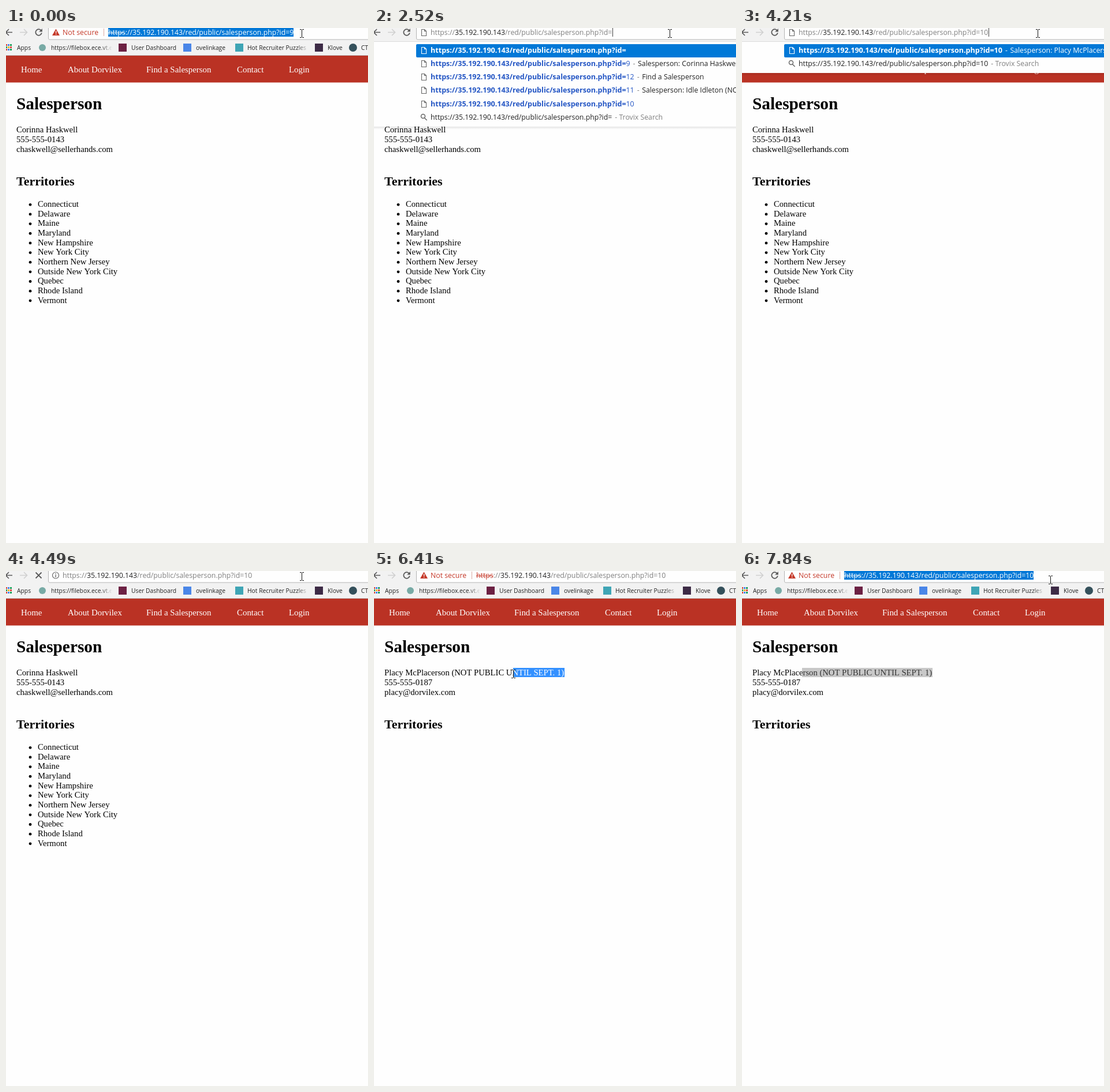
An HTML page with a canvas that plays this animation: 627 px wide and 893 px high, repeating every 8000 ms.

```html
<!DOCTYPE html>
<html lang="en">
<head>
<meta charset="utf-8">
<title>Salesperson lookup</title>
<style>
  html, body { margin: 0; width: 100%; height: 100%; overflow: hidden; background: #fefefe; }
  canvas { display: block; }
</style>
</head>
<body>
<canvas id="stage" width="627" height="893"></canvas>
<script>
const ctx = document.getElementById('stage').getContext('2d');
const LOOP = 8000;
const UI = '12.3px "Open Sans", sans-serif';
const UI_BOLD = 'bold 12.55px "Open Sans", sans-serif';
const SMALL = '10.3px "Open Sans", sans-serif';
const serif = (size, weight = '') => `${weight} ${size}px "Liberation Serif", serif`;
const BODY = serif(14.667);
const BAR = '#f2f2f2', RED = '#c53929', GRAY = '#808080', DARK = '#222', LINK = '#2456c4', BLUE = '#0078d7';
const HOST = '35.192.190.143', PATH = '/red/public/salesperson.php?id=';
const FULL = 'https://' + HOST + PATH;

const TERRITORIES = ['Connecticut', 'Delaware', 'Maine', 'Maryland', 'New Hampshire', 'New York City',
  'Northern New Jersey', 'Outside New York City', 'Quebec', 'Rhode Island', 'Vermont'];
const OLD_PERSON = ['Corinna Haskwell', '555-555-0143', 'chaskwell@sellerhands.com'];
const NEW_PERSON = ['Placy McPlacerson (NOT PUBLIC UNTIL SEPT. 1)', '555-555-0187', 'placy@dorvilex.com'];

// Suggestions: bold ending, plain ending, title
const FIND = 'Find a Salesperson', WHO = 'Salesperson: ';
const IDLE = WHO + 'Idle Idleton (NOT PUBLIC)', PLACY = WHO + NEW_PERSON[0];
const SUGGESTIONS = {
  '': [['', '', ''], ['', '9', WHO + OLD_PERSON[0]], ['', '12', FIND], ['', '11', IDLE], ['', '10', '']],
  '1': [['1', '', WHO + 'Milon Farke'], ['1', '2', FIND], ['1', '1', IDLE], ['1', '0', PLACY]],
  '10': [['10', '', PLACY]]
};

// Step tracks: [start, values...]
const TYPED = [[0, '9'], [1550, ''], [3690, '1'], [4060, '10']];
const CARET = [[0, 0], [410, 1], [1000, 0], [1550, 1], [2110, 0], [2520, 1], [3080, 0], [3690, 1], [4490, 0]];
const PANEL = [[0, 0], [1550, 171], [3690, 165], [3820, 152], [3930, 148], [4060, 91], [4210, 78], [4490, 0]];
const CURSOR = [[0, 'beam', 512, 9], [5590, 'arrow', 466, 39], [5710, 'arrow', 399, 94], [5860, 'arrow', 360, 130],
  [5990, 'beam', 327, 169], [6140, 'arrow', 335, 174], [6260, 'arrow', 337, 175], [6410, 'beam', 241, 178],
  [6560, 'beam', 102, 178], [6690, 'beam', 108, 178], [6840, 'beam', 111, 178], [7000, 'arrow', 410, 188],
  [7150, 'arrow', 481, 68], [7300, 'arrow', 500, 45], [7430, 'arrow', 520, 23], [7570, 'beam', 539, 16],
  [7720, 'beam', 543, 9], [7840, 'beam', 534, 15]];
const MARKED = [[0, 330], [6410, 241], [6560, 98], [6690, 104]];

const at = (track, t) => track.filter(step => step[0] <= t).pop().slice(1);

function rect(x, y, w, h, color) {
  ctx.fillStyle = color;
  ctx.fillRect(x, y, w, h);
}

function dot(x, y, r, color) {
  ctx.fillStyle = color;
  ctx.beginPath();
  ctx.arc(x, y, r, 0, 7);
  ctx.fill();
}

function line(path, color, width = 1.6) {
  ctx.strokeStyle = color;
  ctx.lineWidth = width;
  ctx.stroke(new Path2D(path));
}

// Draws text on a whole-pixel baseline and returns the x where it ends
function text(s, x, y, color, font) {
  ctx.font = font;
  ctx.fillStyle = color;
  ctx.fillText(s, x, Math.round(y));
  return x + ctx.measureText(s).width;
}

function fadeRight(x, y, w, h) {
  const g = ctx.createLinearGradient(x, 0, x + w, 0);
  g.addColorStop(0, BAR + '00');
  g.addColorStop(1, BAR);
  rect(x, y, w, h, g);
}

function clipped(x, y, w, h, draw) {
  ctx.save();
  ctx.beginPath();
  ctx.rect(x, y, w, h);
  ctx.clip();
  draw();
  ctx.restore();
}

function pageIcon(y, color) {
  line(`M82.5 ${y - 5.5}h5l3 3v8h-8zM87.5 ${y - 5.5}v3h3`, color, 1.1);
}

function address(x, id, insecure, selected) {
  ctx.font = UI;
  if (selected) rect(x, 0, Math.round(ctx.measureText(FULL + id).width), 15, BLUE);
  const pick = color => selected ? '#fff' : color;
  const schemeColor = pick(insecure ? RED : GRAY);
  let end = text('https', x, 12, schemeColor, UI);
  if (insecure) rect(x, 8, end - x, 1, schemeColor);
  end = text('://', end, 12, pick(GRAY), UI);
  end = text(HOST, end, 12, pick(DARK), UI);
  return text(PATH + id, end, 12, pick(GRAY), UI);
}

function warning(chipWidth) {
  ctx.fillStyle = RED;
  ctx.fill(new Path2D('M86.5 1.5L93 13H80z'));
  rect(86, 5, 1.3, 4, '#fff');
  rect(86, 10, 1.3, 1.4, '#fff');
  clipped(96, 0, chipWidth - 6, 20, () => text('Not secure', 98, 12, RED, UI));
  rect(96 + chipWidth, 1, 1, 13, '#dba9a2');
}

function toolbar(t, typed, open) {
  rect(0, 0, 627, 47, BAR);
  rect(0, 47, 627, 1, '#bdb6b6');
  rect(73, 0, 554, 20, '#fefefe');
  line('M73.5 0V18q0 2 2 2H627', '#b4b4b4', 1);
  line('M11 7.5H0M5 2L-.5 7.5L5 13', '#5a5a5a');
  line('M24 7.5H36M31 2L36.5 7.5L31 13', '#d0d0d0');
  const loading = t >= 4490 && t < 4910;
  if (loading) line('M51.5 2.5l10 10M61.5 2.5l-10 10', '#5a5a5a', 1.8);
  else {
    line('M61 4.5A5.3 5.3 0 1 0 61.8 8.5', '#5a5a5a', 1.8);
    ctx.fillStyle = '#5a5a5a';
    ctx.fill(new Path2D('M62.8 1v5.6h-5.6z'));
  }

  let end;
  if (open) {
    pageIcon(8, '#666');
    end = address(98, typed, false, false);
  } else if (t >= 4490 && t < 4760) {
    line('M80.5 7.5a5.5 5.5 0 1 0 11 0a5.5 5.5 0 1 0 -11 0', '#666', 1.2);
    rect(85.4, 4, 1.4, 1.5, '#666');
    rect(85.4, 6.6, 1.4, 4.2, '#666');
    end = address(98, typed, false, false);
  } else {
    const sliding = t >= 4760 && t < 4910;
    warning(sliding ? 14 : 73);
    end = address(sliding ? 116 : 177, typed, true, t < 410 || t >= 7720);
  }
  if (at(CARET, t)[0]) rect(Math.ceil(end), 0, 1, 15, '#444');
}

function bookmarks() {
  const label = (s, x) => text(s, x, 38, DARK, SMALL);
  const dots = ['#db4437', '#f4b400', '#0f9d58', '#4285f4'];
  for (let i = 0; i < 9; i++) rect(-1 + i % 3 * 4, 28 + (i / 3 | 0) * 4, 3, 3, dots[(i * 3 + (i / 3 | 0)) % 4]);
  label('Apps', 19);
  dot(63, 34, 6, '#78aaa5');
  clipped(70, 24, 114, 22, () => label('https://filebox.ece.vt.edu', 78));
  fadeRight(164, 25, 20, 20);
  rect(195, 27, 14, 14, '#6c2143');
  label('User Dashboard', 217);
  rect(307, 27, 14, 14, '#4a86e8');
  label('ovelinkage', 329);
  rect(397, 27, 14, 14, '#3fa5b5');
  clipped(411, 24, 113, 22, () => label('Hot Recruiter Puzzles', 418));
  fadeRight(504, 25, 20, 20);
  rect(535, 27, 14, 14, '#3d2b46');
  label('Klove', 557);
  dot(601, 34, 7, '#34505b');
  label('CTF', 615);
}

function page(t) {
  rect(0, 0, 627, 893, '#fefefe');
  rect(0, 48, 627, 46.5, '#ba3224');
  [['Home', 26], ['About Dorvilex', 107], ['Find a Salesperson', 243], ['Contact', 400], ['Login', 490]]
    .forEach(([s, x]) => text(s, x, 77, '#fff', serif(14.9)));
  text('Salesperson', 18, 141, '#000', serif(29.33, 'bold'));
  text('Territories', 18, 273, '#000', serif(22, 'bold'));

  const loaded = t >= 4910;
  const person = loaded ? NEW_PERSON : OLD_PERSON;
  person.forEach((s, i) => text(s, 18, 181.4 + i * 16.67, '#000', BODY));
  if (!loaded) TERRITORIES.forEach((s, i) => {
    dot(42, 306.3 + i * 16.65, 2.4, '#000');
    text(s, 55, 310 + i * 16.65, '#000', BODY);
  });

  const from = at(MARKED, t)[0];
  if (from < 330) clipped(from, 168, 330 - from, 16, () => {
    const focused = t < 7720;
    rect(0, 168, 627, 16, focused ? '#3390ff' : '#c8c8c8');
    text(person[0], 18, 181.4, focused ? '#fff' : '#323232', BODY);
  });
}

function suggestions(typed, bottom) {
  const shade = ctx.createLinearGradient(0, bottom, 0, bottom + 5);
  shade.addColorStop(0, 'rgba(0,0,0,.1)');
  shade.addColorStop(1, 'rgba(0,0,0,0)');
  rect(0, bottom, 627, 5, shade);
  rect(0, 23, 627, bottom - 23, '#fefefe');
  rect(0, 23, 627, 1, '#dcdcdc');

  clipped(0, 24, 627, bottom - 24, () => {
    const rows = SUGGESTIONS[typed];
    rows.forEach(([bold, plain, title], i) => {
      const y = Math.round(39 + i * 23.15), base = y + 4, active = i === 0;
      const pick = color => active ? '#fff' : color;
      if (active) {
        ctx.fillStyle = BLUE;
        ctx.beginPath();
        ctx.roundRect(73, 28, 560, 23, 2);
        ctx.fill();
      }
      pageIcon(y, pick('#666'));
      let x = text(FULL + bold, 98, base, pick(LINK), UI_BOLD);
      x = text(plain, x, base, pick(LINK), UI);
      if (title) {
        text('-', x + 5, base, pick(GRAY), UI);
        text(title, x + 13.5, base, pick(DARK), UI);
      }
    });
    const y = Math.round(39 + rows.length * 23.15);
    line(`M81.5 ${y - 2}a3.5 3.5 0 1 0 7 0a3.5 3.5 0 1 0 -7 0M87.6 ${y + 1}l4 4`, '#666', 1.5);
    const x = text(FULL + typed, 98, y + 4, DARK, UI);
    text('- Trovix Search', x + 5, y + 4, GRAY, UI);
  });
}

function cursor([kind, x, y]) {
  ctx.save();
  ctx.translate(x, y);
  if (kind === 'beam') {
    line('M-3 -6.5h2.5l1 1l1 -1h2.5M.5 -6v13M-3 7.5h2.5l1 -1l1 1h2.5', '#111', 1);
  } else {
    const shape = 'M.5 .5V16L4 12.7L6.5 18.5L8.8 17.5L6.4 11.8H11.2z';
    ctx.fillStyle = '#fff';
    ctx.fill(new Path2D(shape));
    line(shape, '#111', 1);
  }
  ctx.restore();
}

function draw(t) {
  const typed = at(TYPED, t)[0], bottom = at(PANEL, t)[0];
  page(t);
  toolbar(t, typed, bottom > 0);
  bookmarks();
  if (bottom) suggestions(typed, bottom);
  cursor(at(CURSOR, t));
}

const start = performance.now();
function tick() {
  draw((performance.now() - start) % LOOP);
  requestAnimationFrame(tick);
}
tick();
</script>
</body>
</html>
```
